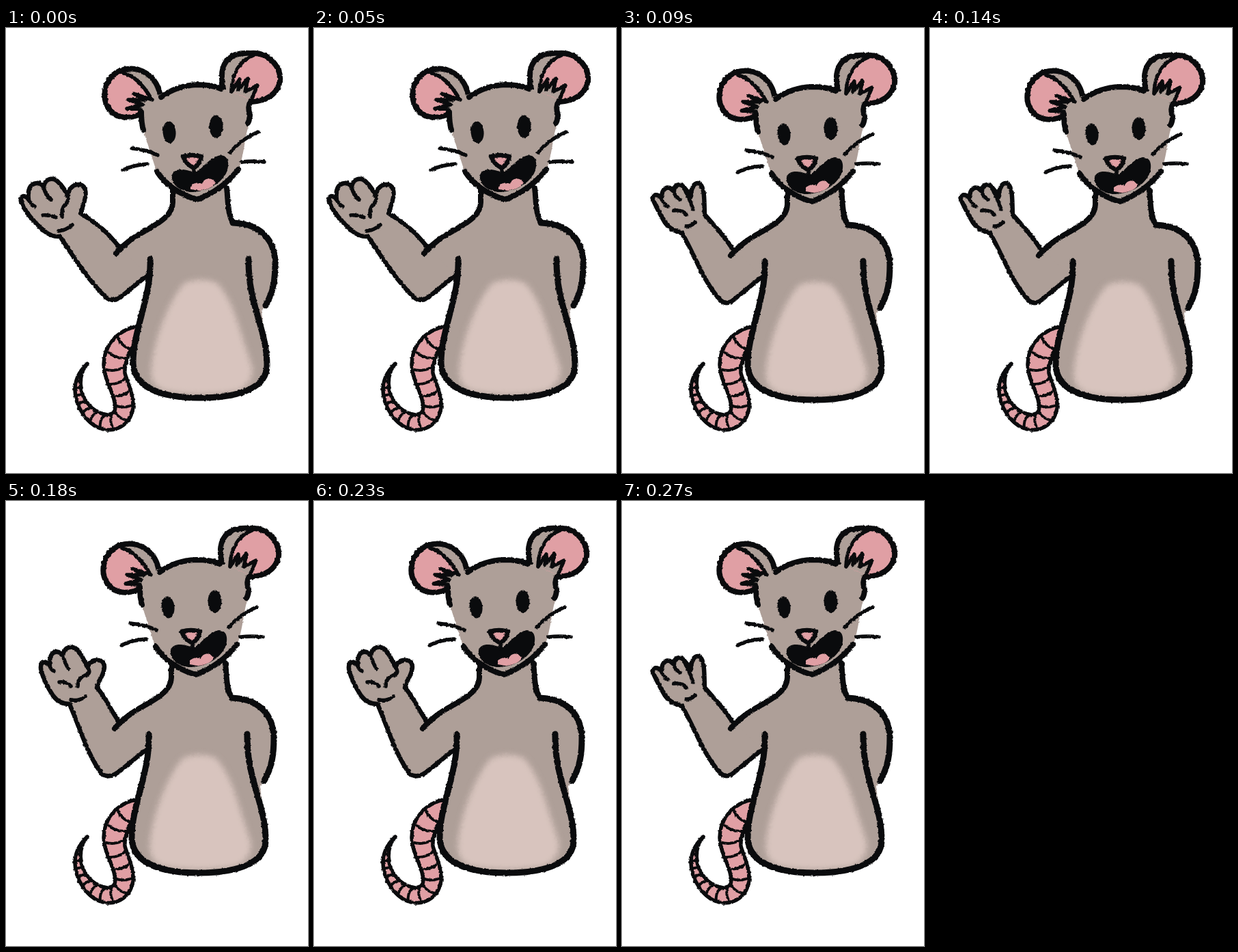
An HTML page for the animation above (360 ms loop, 442 px wide and 651 px high).

```html
<!DOCTYPE html>
<html lang="en">
<head>
<meta charset="utf-8">
<title>Waving rat</title>
<style>
  html, body { margin: 0; height: 100%; overflow: hidden; background: #fff; }
  svg { display: block; width: 100%; height: 100%; }
  path { stroke-linecap: round; stroke-linejoin: round; }
  .fur { fill: #ae9f98; }
  .pink { fill: #e09fa4; }
  .ink { fill: #0a0b0d; }
  .line { fill: none; }
  .line, .edge { stroke: #0a0b0d; stroke-width: 8; }
  .bold { stroke-width: 9; }
  .limb { stroke-width: 6.5; }
  .thin { stroke-width: 5.5; }
  .ring { stroke-width: 4; }
  .body { animation: bob .36s step-end infinite; }
  .low { animation: low .36s step-end infinite; }
  .mid { animation: mid .36s step-end infinite; }
  .high { animation: high .36s step-end infinite; }
  @keyframes bob { 0% { transform: none; } 25%, 100% { transform: translate(-2px, 3px); } }
  @keyframes low { 0% { visibility: visible; } 25%, 100% { visibility: hidden; } }
  @keyframes mid { 0%, 50% { visibility: hidden; } 25%, 75%, 100% { visibility: visible; } }
  @keyframes high { 0%, 75%, 100% { visibility: hidden; } 50% { visibility: visible; } }
</style>
</head>
<body>
<svg viewBox="0 0 442 651">
  <defs>
    <filter id="rough" filterUnits="userSpaceOnUse" x="0" y="0" width="442" height="651" color-interpolation-filters="sRGB">
      <feTurbulence type="fractalNoise" baseFrequency=".25" numOctaves="2" seed="4"/>
      <feDisplacementMap in="SourceGraphic" scale="3" xChannelSelector="R" yChannelSelector="G"/>
    </filter>
    <filter id="soft"><feGaussianBlur stdDeviation="4"/></filter>
    <path id="spine" d="M191 449C170 455 158 478 158 497C160 520 174 535 173 556C171 573 160 578 147 577C135 577 122 567 115 557C103 540 99 512 119 491"/>
  </defs>
  <g filter="url(#rough)">
    <path class="pink" d="M194 436C160 442 143 468 143 492C143 515 160 535 160 556C158 572 135 566 122 552C106 535 105 508 119 491C110 500 102 510 101 527C100 550 118 585 148 588C165 589 183 578 186 556C187 535 178 520 174 505C173 490 180 475 188 462Z"/>
    <g id="rings"></g>
    <path class="line thin" d="M194 436C160 442 143 468 143 492C143 515 160 535 160 556C158 572 135 566 122 552C106 535 105 508 119 491C110 500 102 510 101 527C100 550 118 585 148 588C165 589 183 578 186 556C187 535 178 520 174 505C173 490 180 475 188 462"/>

    <g class="body">
      <path class="fur" d="M244 230V255C244 275 222 286 205 296C190 304 175 315 163 328L208 362C207 390 186 440 186 490C187 525 225 541 283 541C345 541 382 525 382 493C382 470 377 440 374 415L379 406C392 385 394 365 394 343C393 305 367 286 332 285C325 270 325 250 322 230Z"/>
      <path fill="#d8c4be" filter="url(#soft)" d="M259 375C270 367 298 366 311 375C325 392 335 415 342 440L360 495Q364 518 340 531Q284 541 232 531Q209 523 213 494C216 460 235 405 259 375Z"/>
    </g>

    <g class="low">
      <path class="fur edge limb" d="M208 361L171 391Q158 403 146 394C119 367 101 338 79 305Q67 306 56 297C42 285 28 269 22 254C20 244 29 244 33 251C31 235 36 228 45 227Q52 226 55 234C56 220 68 218 75 224C83 231 88 240 91 248C90 235 99 228 108 229C118 231 118 244 114 256L109 271C136 288 148 298 167 322"/>
      <path class="line thin" d="M32 249Q36 258 42 261M55 233Q58 245 66 251M91 247Q92 253 86 259Q81 264 82 276M54 274Q63 273 73 277M77 297Q88 296 97 288"/>
    </g>
    <g class="mid">
      <path class="fur edge limb" d="M206 363L169 393Q154 408 144 398C120 372 109 338 88 300Q71 296 63 285C55 271 49 260 45 250C44 243 52 242 58 249C58 239 62 232 70 234L76 239C76 229 84 227 90 232Q96 239 101 246C101 235 105 226 112 227C122 231 120 252 121 273C136 290 148 302 161 322"/>
      <path class="line thin" d="M57 248Q60 257 67 261M75 238Q77 246 85 251M91 235Q98 247 104 265M76 267Q89 266 94 273M94 290Q102 290 107 284"/>
    </g>
    <g class="high">
      <path class="fur edge limb" d="M206 363L169 393Q152 408 140 399C120 372 109 335 93 297Q78 297 69 285C60 271 53 257 51 245C50 234 58 234 64 240C63 225 69 219 77 221L83 226C85 213 96 211 104 217C111 225 115 234 119 243C122 233 132 231 140 234C147 239 144 251 136 264L133 273C146 287 152 304 164 321"/>
      <path class="line thin" d="M63 239Q65 247 71 249M83 224Q86 238 92 246M119 243Q126 252 116 255Q105 259 105 271M78 265Q89 264 95 271M95 291Q108 293 116 286"/>
    </g>

    <g class="body">
      <path class="line" d="M244 236V255C244 275 222 286 205 296C190 304 173 315 161 330M323 234C325 250 324 270 332 285"/>
      <path class="line bold" d="M332 285C367 286 393 305 394 343C394 365 392 385 380 406M211 338C213 395 186 440 186 490C187 525 225 541 283 541C345 541 382 525 382 493C382 440 354 405 355 338"/>

      <path class="fur" d="M226 101C222 70 195 53 168 62C144 72 139 100 150 117C160 133 181 134 199 125Z"/>
      <path class="pink" d="M168 66C142 76 140 100 151 116C160 129 177 131 192 127L212 104C203 88 190 72 168 66Z"/>
      <path class="line" d="M226 101C222 70 195 53 168 62C144 72 139 100 150 117C160 133 181 134 199 125"/>
      <path class="line thin" d="M172 66C190 70 203 87 213 104"/>
      <path class="fur" d="M318 89C310 52 325 35 358 37C386 35 403 58 401 78C397 97 381 107 359 108Z"/>
      <path class="pink" d="M363 39C340 48 329 73 330 93L358 106C382 106 397 96 400 78C401 58 385 38 363 39Z"/>
      <path class="line" d="M318 89C310 52 325 35 358 37C386 35 403 58 401 78C397 97 381 107 359 108"/>
      <path class="line thin" d="M362 40C341 48 331 68 330 91"/>

      <path class="fur" d="M214 103Q250 82 282 83Q305 84 320 90L356 104L356 140C350 155 349 183 341 206Q310 239 279 250Q242 238 220 209L203 156L197 122Z"/>
      <path class="fur" d="M214 105L187 96L204 105L179 105L200 112L177 118L197 119L194 128Z"/>
      <path class="line thin" d="M214 105L187 96L204 105L179 105L200 112L177 118L197 119L194 128"/>
      <path class="fur" d="M330 93L342 75L340 90L354 74L350 93L368 84L359 105Z"/>
      <path class="line thin" d="M330 93L342 75L340 90L354 74L350 93L368 84L359 105"/>
      <path class="line" d="M227 101Q250 84 280 83Q302 83 315 89M198 123Q198 139 201 149M358 107Q353 116 357 126Q357 134 354 139"/>
      <path class="line" d="M221 210C235 232 257 244 279 251C305 242 325 226 340 207"/>
      <ellipse class="ink" cx="239" cy="152.500" rx="9.500" ry="16" transform="rotate(-4 239 152)"/>
      <ellipse class="ink" cx="307.500" cy="144" rx="10" ry="16.500"/>
      <path class="line thin" d="M184 176Q206 178 222 186M171 208Q187 200 207 199M369 152Q345 162 328 182M345 196Q362 194 378 196"/>

      <path class="ink" d="M243 215C246 205 260 205 274 211C285 212 294 190 314 186C326 186 328 200 322 213C312 230 292 240 270 240C253 238 241 228 243 215Z"/>
      <path class="pink" d="M271 236C270 228 278 224 287 228C289 219 302 218 306 226C305 232 294 237 283 238Z"/>
      <path class="pink edge limb" d="M259 188Q273 184 286 188Q284 198 275 205Q263 199 259 188Z"/>
      <path class="line thin" d="M275 204V213"/>
    </g>
  </g>
</svg>
<script>
  const spine = document.getElementById('spine');
  const rings = document.getElementById('rings');
  const length = spine.getTotalLength();
  const RINGS = 19;

  // Rings cross the spine at right angles, closer and narrower towards the tip.
  for (let i = 1; i <= RINGS; i++) {
    const t = 1 - (1 - i / (RINGS + 1)) ** 1.6;
    const half = 15 * Math.min(1, 1.75 * (1 - t));
    const p = spine.getPointAtLength(length * t);
    const next = spine.getPointAtLength(length * t + 1);
    const angle = Math.atan2(next.y - p.y, next.x - p.x) * 180 / Math.PI;
    const ring = document.createElementNS('http://www.w3.org/2000/svg', 'path');
    ring.setAttribute('class', 'line ring');
    ring.setAttribute('d', `M0 ${-half}Q${half * .5} 0 0 ${half}`);
    ring.setAttribute('transform', `translate(${p.x} ${p.y}) rotate(${angle})`);
    rings.append(ring);
  }
</script>
</body>
</html>
```
